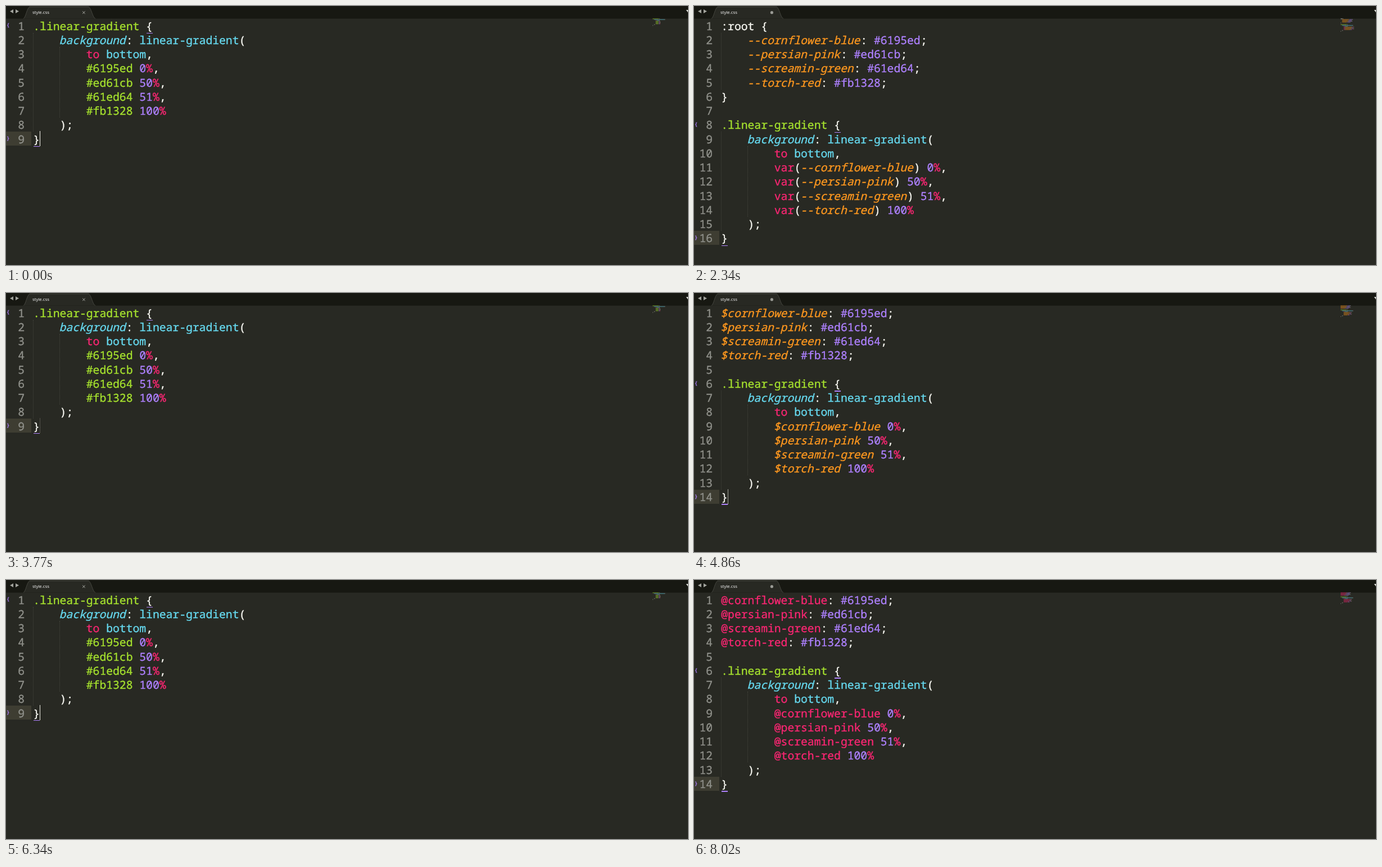
An HTML page for the animation above (8.1 s loop, 1213 by 462 pixels).

```html
<!DOCTYPE html>
<html lang="en">
<meta charset="utf-8">
<title>style.css</title>
<style>
html, body { margin: 0; height: 100%; overflow: hidden; background: #282923; }
svg, pre, i { position: absolute; margin: 0; }
svg { left: 0; top: 0; }
pre, .fold { font: 19.71px/25.25px "Noto Sans Mono", "DejaVu Sans Mono", monospace; text-rendering: geometricPrecision; -webkit-text-stroke: .35px; color: #f8f8f2; }
#code { left: 48.3px; top: 22.6px; }
#nums { left: 0; top: 22.6px; width: 33px; text-align: right; color: #90918b; }
#map { left: 1150px; top: 22px; transform: scale(.059); transform-origin: 0 0; opacity: .4; }
#map span { background: currentColor; }
#cursor { left: 60px; width: 1px; height: 27px; background: #f8f8f0; }
#active { left: 0; width: 45px; height: 25px; background: #3e3d32; }
.guide { width: 0; border-left: 1px dotted #44453d; }
.line { width: 11.5px; height: 1.5px; background: #ae81ff; }
.fold { left: 1px; font-size: 9px; font-style: normal; color: #ae81ff; }
.green { color: #a6e22e; }
.cyan { color: #66d9ef; }
.pink { color: #f92672; }
.purple { color: #ae81ff; }
.orange { color: #fd971f; }
.italic { font-style: italic; position: relative; left: -1px; }
</style>
<svg width="1213" height="462">
  <path d="M0 0H1213V22.5H0z" fill="#171812"/>
  <path d="M31 22.5C35 21 37 4 42 1.5H147C152 4 154 21 159 22.5z" fill="#282923"/>
  <path d="M31 22.5C35 21 37 4 42 1.5H147C152 4 154 21 159 22.5" fill="none" stroke="#45463f"/>
  <path d="M13 6V13L7 9.5zM17 6V13L23 9.5z" fill="#a3a49e"/>
  <path d="M1209.5 7H1217L1213 11.5z" fill="#d8d9d3"/>
  <text x="47" y="14" font-size="7.8" font-family="Open Sans, sans-serif" fill="#fff">style.css</text>
  <path id="close" d="M136.2 9.5L140.6 13.9M140.6 9.5L136.2 13.9" stroke="#b5b6b0"/>
  <circle id="dirty" cx="138.4" cy="11.7" r="2.6" fill="#9a9b95"/>
</svg>
<i id="active"></i>
<div id="marks"></div>
<pre id="nums"></pre>
<pre id="code"></pre>
<pre id="map"></pre>
<i id="cursor"></i>
<script>
const LOOP = 8100, TOP = 22.3, ROW = 25.25, COL = 11.826;
const PEAK = 750, HALF = 290, FADE = 200; // cursor blink after each edit, in ms
const $ = id => document.getElementById(id);

const colors = [['cornflower-blue', '#6195ed', '0%'], ['persian-pink', '#ed61cb', '50%'],
  ['screamin-green', '#61ed64', '51%'], ['torch-red', '#fb1328', '100%']];

const rule = stop => ['.linear-gradient {', '    background: linear-gradient(', '        to bottom,',
  ...colors.map((c, i) => `        ${stop(c)} ${c[2]}${i < 3 ? ',' : ''}`), '    );', '}'];
const vars = prefix => colors.map(c => `${prefix}${c[0]}: ${c[1]};`);

const views = [
  rule(c => c[1]),
  [':root {', ...vars('    --'), '}', '', ...rule(c => `var(--${c[0]})`)],
  ...['$', '@'].map(p => [...vars(p), '', ...rule(c => p + c[0])])
];

// [start, view]; the first starts early, so the loop opens with the cursor lit
const edits = [[-PEAK, 0], [80, 0], [1090, 1], [2670, 0], [3840, 2], [5390, 0], [6570, 3]];

const words = { background: 'cyan italic', 'linear-gradient': 'cyan', bottom: 'cyan', to: 'pink', var: 'pink', '%': 'pink' };

function style(token, view) {
  if (/^(--|\$)/.test(token)) return 'orange italic';
  if (token[0] === '@') return 'pink';
  if (token[0] === '.') return 'green';
  if (token[0] === '#') return view ? 'purple' : 'green';
  if (/^\d/.test(token)) return 'purple';
  return words[token] || '';
}

const paint = (line, view) => line.replace(/(--|[$@.#])[\w-]+|\d+|[a-z-]+|[^\s]/g,
  token => `<span class="${style(token, view)}">${token}</span>`);

const rowTop = row => TOP + row * ROW;

function guide(col, from, to) {
  const left = Math.round(48 + col * COL);
  return `<i class="guide" style="left:${left}px;top:${rowTop(from)}px;height:${(to - from) * ROW}px"></i>`;
}

function brace(char, row, col) {
  return `<i class="line" style="left:${48.6 + col * COL}px;top:${rowTop(row) + 25.5}px"></i>` +
    `<i class="fold" style="top:${rowTop(row) - 1}px">${char}</i>`;
}

function show(view) {
  const lines = views[view], last = lines.length - 1, open = last - 8;
  $('code').innerHTML = $('map').innerHTML = lines.map(l => paint(l, view)).join('\n');
  $('nums').textContent = lines.map((_, i) => i + 1).join('\n');
  $('marks').innerHTML = brace('{', open, 17) + brace('}', last, 0) +
    guide(0, open + 1, last) + guide(4, open + 2, last - 1) + (view === 1 ? guide(0, 1, 5) : '');
  $('active').style.top = rowTop(last) + 'px';
  $('cursor').style.top = rowTop(last) - 1 + 'px';
  $('close').style.display = view ? 'none' : '';
  $('dirty').style.display = view ? '' : 'none';
}

let shown = -1;
function frame() {
  const t = performance.now() % LOOP;
  const [start, view] = edits.findLast(e => e[0] <= t);
  if (view !== shown) show(shown = view);
  const glow = .5 + (HALF - Math.abs(t - start - PEAK)) / FADE;
  $('cursor').style.opacity = Math.max(0, Math.min(1, glow));
  requestAnimationFrame(frame);
}
frame();
</script>
</html>
```
